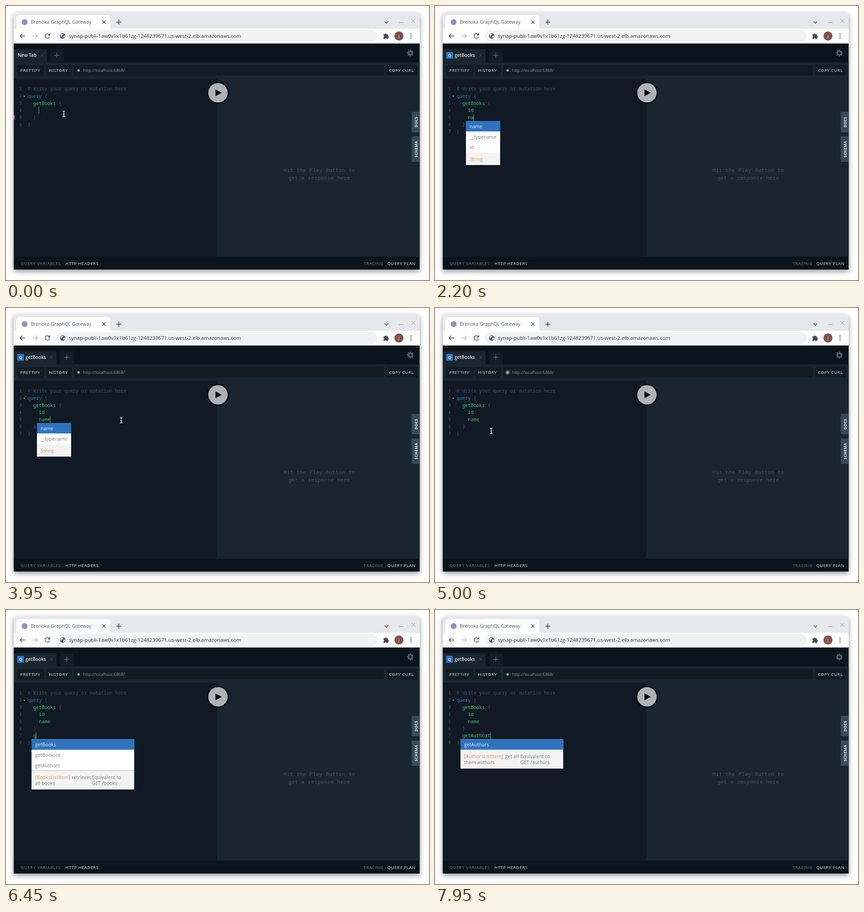
These frames come from a looping animation (929x603 px, 8000 ms). An HTML page:

```html
<!DOCTYPE html>
<html lang="en">
<head>
<meta charset="utf-8">
<title>GraphQL playground</title>
<style>
html, body { margin: 0; width: 100%; height: 100%; overflow: hidden; background: #fff; }
svg { display: block; width: 929px; height: 603px; font-family: "Open Sans", sans-serif; }
.window { filter: drop-shadow(0 4px 6px rgba(0, 0, 0, .42)); }
.caps { font-size: 9.4px; font-weight: 600; letter-spacing: .42px; fill: #a9b0b5; }
.faint { fill: #56626a; }
.side { font-size: 8.4px; font-weight: 700; letter-spacing: .3px; fill: #e6eaec; text-anchor: middle; }
.code { font: 10.33px "Noto Sans Mono", monospace; white-space: pre; }
.field { font-weight: 500; }
.hint { font: 11.1px "Noto Sans Mono", monospace; letter-spacing: .48px; fill: #4a565e; text-anchor: middle; }
.num { font: 8px "Noto Sans Mono", monospace; fill: #56626b; text-anchor: middle; }
.pop { font-size: 10.4px; letter-spacing: .1px; fill: #73777b; }
.tab { font-size: 10px; font-weight: 600; fill: #dfe3e5; }
.line { fill: none; stroke: #3c4043; stroke-width: 1.4; }
</style>
</head>
<body>
<svg viewBox="0 0 929 603">
  <g class="window">
    <path fill="#e7e8ec" d="M17 580V22q0-8 8-8H900.5q8 0 8 8V580z"/>
  </g>

  <!-- browser frame -->
  <path fill="#fff" d="M17 50h2q4 0 4-4V27q0-7 7-7H222q7 0 7 7v19q0 4 4 4H908.5V83H17z"/>
  <circle cx="41" cy="35.5" r="6.5" fill="#8d92be"/>
  <text x="54.5" y="39" font-size="10.52" fill="#50545a">Brenoka GraphQL Gateway</text>
  <path class="line" d="M211.5 32l7 7m0-7l-7 7M242.5 35.5h11M248 30v11"/>
  <path class="line" d="M831.5 34l4 4 4-4"/>
  <path class="line" style="stroke:#8d9196;stroke-width:1" d="M863 36.5h10M890.5 28.5l8 8m0-8l-8 8"/>
  <path class="line" d="M42 66H31m5-5l-5 5 5 5"/>
  <path class="line" style="stroke:#b4b7ba" d="M58 66h11m-5-5l5 5-5 5"/>
  <path class="line" d="M95.5 63.5a5 5 0 1 0 .3 4M96 60v4h-4"/>
  <rect x="110" y="53" width="706" height="26" rx="13" fill="#f1f2f4"/>
  <circle cx="124.5" cy="66" r="6" fill="#55595d"/>
  <path d="M120 63q3-3 5-1t-2 3-1 2-2 0M125 68l3-3 2 1q0 3-3 4z" fill="#f1f2f4"/>
  <text x="138" y="70" font-size="11.22" fill="#33363a">synap-publi-1aw0v1x1b61zg-1248239671.us-west-2.elb.amazonaws.com</text>
  <path fill="#44484c" d="M829 62.5h3a2 2 0 0 1 4 0h3v3.5a2 2 0 0 1 0 4v2.5h-3.5a1.8 1.8 0 0 0-3.5 0h-3v-3.5a1.8 1.8 0 0 0 0-3.5z"/>
  <circle cx="863" cy="66" r="10" fill="#83504c"/>
  <text x="863" y="69.5" font-size="9.5" fill="#eee4e3" text-anchor="middle">J</text>
  <g fill="#44484c"><circle cx="889.5" cy="61.5" r="1.3"/><circle cx="889.5" cy="66" r="1.3"/><circle cx="889.5" cy="70.5" r="1.3"/></g>

  <!-- playground -->
  <rect x="17" y="82.5" width="891.5" height="497.5" fill="#0a141c"/>
  <rect x="17" y="124" width="891.5" height="427.5" fill="#1a262f"/>
  <rect x="17" y="160" width="447" height="391.5" fill="#111a24"/>
  <g id="tabs"></g>
  <g fill="none" stroke="#59646b">
    <circle cx="888" cy="103.5" r="4.2" stroke-width="3"/>
    <circle cx="888" cy="103.5" r="6.5" stroke-width="2" stroke-dasharray="2.5 2.605" stroke-dashoffset="1.25"/>
  </g>
  <g fill="#111c25">
    <rect x="24" y="130" width="60" height="23" rx="2"/>
    <rect x="88" y="130" width="56" height="23" rx="2"/>
    <rect x="149" y="130" width="681" height="23" rx="2"/>
    <rect x="835" y="130" width="69" height="23" rx="2"/>
  </g>
  <g class="caps">
    <text x="31" y="145">PRETTIFY</text>
    <text x="94" y="145">HISTORY</text>
    <text x="841" y="145">COPY CURL</text>
    <text class="faint" x="32" y="570">QUERY VARIABLES</text>
    <text x="130.5" y="570">HTTP HEADERS</text>
    <text class="faint" x="785.5" y="570">TRACING</text>
    <text x="837.5" y="570">QUERY PLAN</text>
  </g>
  <circle id="glow" cx="159.5" cy="141.7" r="5.5" fill="#4d5860"/>
  <circle cx="159.5" cy="141.7" r="2.7" fill="#a2a9ae"/>
  <text x="169.5" y="145" font-size="9.1" fill="#8b949a">http://localhost:6868/</text>
  <text class="hint" x="688" y="365">Hit the Play Button to</text>
  <text class="hint" x="688" y="381.5">get a response here</text>
  <circle cx="465.5" cy="191" r="25" fill="#0a131b"/>
  <circle cx="465.5" cy="191" r="21.3" fill="#aeb1b6"/>
  <path d="M460 183.5v15l14-7.5z" fill="#05090d"/>
  <path fill="#394b57" d="M908.5 233H893q-2 0-2 2v41q0 2 2 2h15.5zM908.5 287H893q-2 0-2 2v52q0 2 2 2h15.5z"/>
  <text class="side" transform="translate(904 255.5) rotate(-90)">DOCS</text>
  <text class="side" transform="translate(904 315) rotate(-90)">SCHEMA</text>

  <path d="M38 197.5h4.5l-2.25 3z" fill="#8a949b"/>
  <g id="editor"></g>
  <rect id="error" x="17" y="240.5" width="2.5" height="9.5" fill="#cf4549"/>
  <rect id="caret" width="1" height="15" fill="#7f9a8c"/>
  <g id="popup"></g>
  <g id="mouse" fill="none">
    <path id="beam" d="M-3-6q3 0 3 2q0-2 3-2M0-4V4M-3 6q3 0 3-2q0 2 3 2M-1.5 1h3" stroke="#080d12" stroke-width="3"/>
    <use href="#beam" style="display:none"/>
    <path d="M-3-6q3 0 3 2q0-2 3-2M0-4V4M-3 6q3 0 3-2q0 2 3 2M-1.5 1h3" stroke="#dfe2e4" stroke-width="1.5"/>
  </g>
</svg>
<script>
const LOOP = 8000, CHAR = 6.2, LEFT = 47.5, TOP = 183, STEP = 15.6;
const $ = id => document.getElementById(id);
const cache = {};
const fill = (id, html) => { if (cache[id] !== html) $(id).innerHTML = cache[id] = html; };
const show = (id, on) => $(id).setAttribute('visibility', on ? 'visible' : 'hidden');
const text = (x, y, str, attrs = '') => `<text x="${x}" y="${y}" ${attrs}>${str}</text>`;
const rect = (x, y, w, h, color) => `<rect x="${x}" y="${y}" width="${w}" height="${h}" fill="${color}"/>`;
const within = (t, spans) => spans.some(([a, b]) => t >= a && t < b);

// Key presses: word and the time of each letter
const keys = {
  id: [400, 600],
  name: [2000, 2150, 2350, 2500],
  getAuthort: [6450, 6600, 6700, 6950, 7100, 7300, 7450, 7600, 7750, 7900]
};
const typed = (t, word) => word.slice(0, keys[word].filter(k => t >= k).length);

function tabs(named) {
  const w = named ? 94 : 73, plus = named ? 119 : 97, close = named ? 100 : 79;
  return rect(17, 95, w, 30, '#1a262f') + rect(plus, 95, 30, 28, '#121d26') +
    (named
      ? rect(24.5, 101, 15, 15, '#2e75bf') + text(28.5, 112, 'Q', 'font-size="9" font-weight="600" fill="#dcebf8"') + text(43, 112, 'getBooks', 'class="tab"')
      : text(26, 112, 'New Tab', 'class="tab"')) +
    `<path d="M${close - 3} 105.5l6 6m0-6l-6 6" stroke="#4d5961" fill="none"/>` +
    `<path d="M${plus + 9} 108.5h11m-5.5-5.5v11" stroke="#616c73" stroke-width="1.4" fill="none"/>`;
}

function codeLines(t) {
  const lines = ['# Write your query or mutation here', 'query {', '  getBooks {', '    ' + typed(t, 'id')];
  if (t >= 1150) lines.push('    ' + typed(t, 'name'));
  lines.push('  }');
  if (t >= 5400) lines.push('  ' + typed(t, 'getAuthort'));
  return [...lines, '}'];
}

function paint(line, i) {
  const body = line.trim(), y = +(TOP + STEP * i + 3.3).toFixed(2);
  const x = LEFT + CHAR * (line.length - line.trimStart().length);
  const comment = body[0] === '#';
  const html = comment ? body : body.replace(/\w+/, w => w === 'query'
    ? `<tspan fill="#2d78bd">${w}</tspan>`
    : `<tspan class="field" fill="#43c072">${w}</tspan>`);
  return text(32, y - .5, i + 1, 'class="num"') +
    text(x, y, html, `class="code" fill="${comment ? '#465159' : '#55616a'}"`);
}

function popup(x, y, w, items, notes, footH) {
  const h = items.length * 23;
  return rect(x, y, w, h, '#fff') + rect(x, y, w, 23, '#2f73bf') + rect(x, y + h, w, footH, '#f3f3f3') +
    items.map((s, i) => text(x + 8, y + 15.5 + 23 * i, s, i ? '' : 'fill="#e4eef8"')).join('') +
    notes.map(([dx, row, s, c]) => text(x + dx, y + h + 18.5 + 13 * row, s, c ? `fill="${c}"` : '')).join('');
}

const ORANGE = '#dc935d';
const fieldPopup = (y, items, type) => popup(68, y, 75, items, [[8, 0, type, ORANGE]], 28);
const queryPopup = (items, notes) => popup(56, 284.5, 225.5, items, notes, 41.5);

function suggestions(t) {
  if (t >= 400 && t < 600) return fieldPopup(237.5, ['id', '__typename', 'name'], 'ID');
  if (t >= 600 && t < 850) return fieldPopup(237.5, ['id'], 'ID');
  if (t >= 2000 && t < 2350) return fieldPopup(253, ['name', '__typename', 'id'], 'String');
  if (t >= 2350 && t < 4350) return fieldPopup(253, ['name', '__typename'], 'String');
  if (t >= 6450 && t < 6950) return queryPopup(['getBooks', 'getBooksId', 'getAuthors'], [
    [8, 0, '[BooksListItem]', ORANGE], [88.5, 0, 'retrieves'], [8, 1, 'all books'],
    [132.5, 0, 'Equivalent to'], [132.5, 1, 'GET /books']]);
  if (t >= 6950) return queryPopup(['getAuthors'], [
    [8, 0, '[AuthorsListItem]', ORANGE], [98, 0, 'get all'], [8, 1, 'them authors'],
    [131.5, 0, 'Equivalent to'], [131.5, 1, 'GET /authors']]);
  return '';
}

function caretAt(t) {
  if (t < 1150) return [3, 4 + typed(t, 'id').length];
  if (t < 4350) return [4, 4 + typed(t, 'name').length];
  if (t < 5400) return [5, 3];
  return [6, 2 + typed(t, 'getAuthort').length];
}
const caretOff = [[1600, 2000], [3050, 3600], [4100, 4350], [4850, 5150], [6000, 6450]];

const path = [[3600, 127, 237], [3900, 253, 247], [4100, 253, 247], [4400, 186, 262], [4800, 123.5, 270.5]];
function mouseAt(t) {
  const n = path.findIndex(p => t < p[0]);
  if (n < 1) return (n ? path.at(-1) : path[0]).slice(1);
  const [t0, x0, y0] = path[n - 1], [t1, x1, y1] = path[n];
  const u = (t - t0) / (t1 - t0), e = u * u * (3 - 2 * u);
  return [x0 + (x1 - x0) * e, y0 + (y1 - y0) * e];
}

function frame(now) {
  const t = now % LOOP;
  fill('tabs', tabs(t >= 400));
  fill('editor', codeLines(t).map(paint).join(''));
  fill('popup', `<g class="pop">${suggestions(t)}</g>`);

  const [row, col] = caretAt(t);
  $('caret').setAttribute('x', LEFT + CHAR * col - .5);
  $('caret').setAttribute('y', TOP + STEP * row - 7.5);
  show('caret', !within(t, caretOff));
  show('error', t < 1600);

  $('mouse').setAttribute('transform', `translate(${mouseAt(t)})`);
  show('mouse', within(t, [[0, 400], [3600, 5400]]));

  // The connection dot pulses with each poll, every two seconds
  const p = (t + 1100) % 2000;
  $('glow').setAttribute('opacity', p < 400 ? Math.sin(Math.PI * p / 400) ** .5 : 0);
  requestAnimationFrame(frame);
}
frame(performance.now());
</script>
</body>
</html>
```
